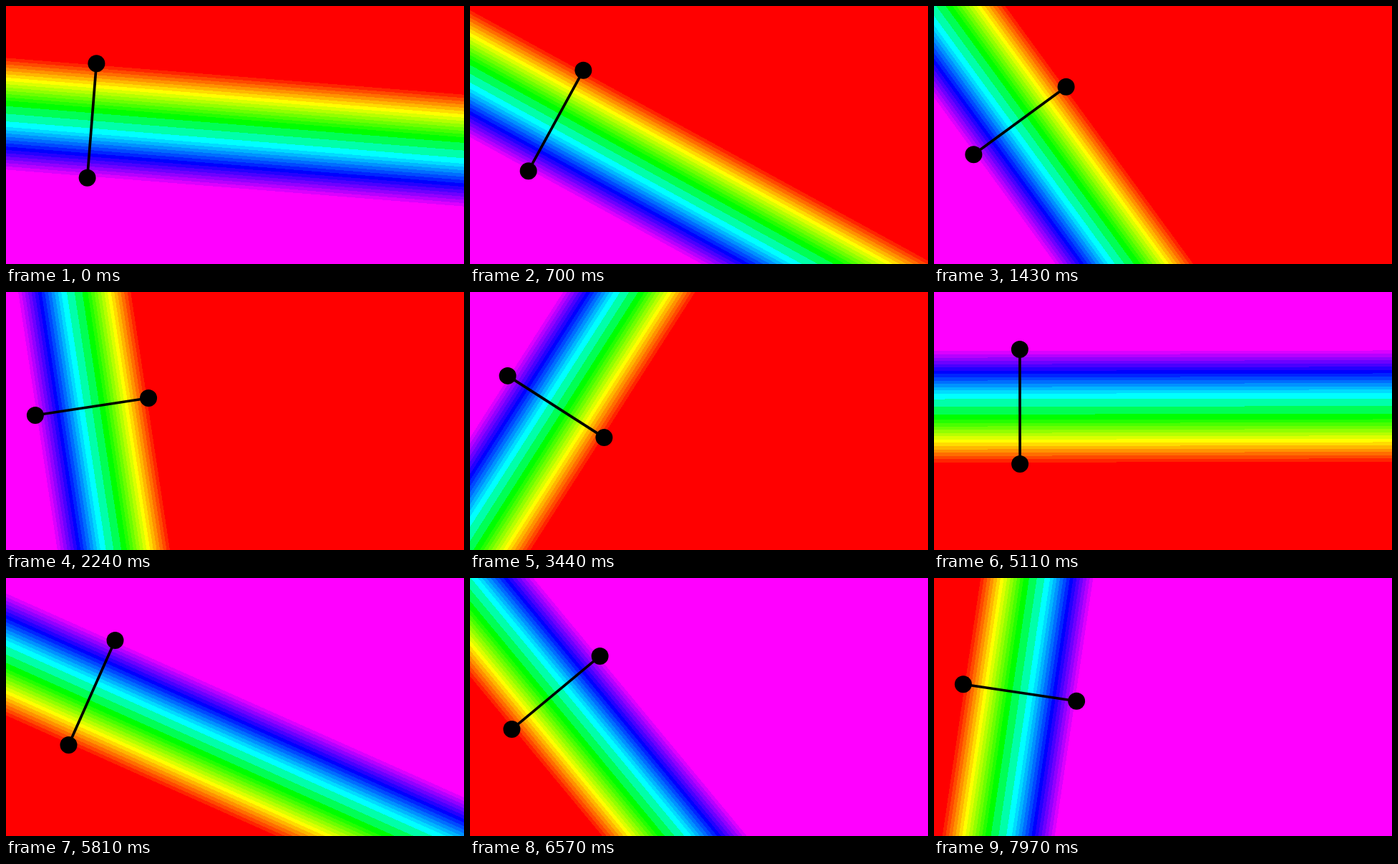
Write an HTML page with a canvas that moves like this. It is 640 by 360 pixels and loops after 8000 ms.

```html
<!DOCTYPE html>
<html lang="en">
<head>
<meta charset="utf-8">
<title>Rotating spectrum</title>
<style>
  html, body { margin: 0; width: 100%; height: 100%; overflow: hidden; background: #f00; }
  canvas { display: block; width: 640px; height: 360px; }
</style>
</head>
<body>
<canvas id="stage" width="640" height="360"></canvas>
<script>
  const ctx = document.getElementById('stage').getContext('2d');
  const LOOP = 8000, FRAME = 1000 / 30;
  const CENTER = { x: 120, y: 160 }, RADIUS = 80;
  const START_ANGLE = 0.08, ANGLE_STEP = 0.02;

  // Hue corners from red to magenta; blue has fewer levels than red and green.
  const corners = [[255, 0, 0], [255, 255, 0], [0, 255, 0], [0, 255, 255], [0, 0, 255], [255, 0, 255]];
  const levels = [7, 7, 3, 7, 7];
  const stops = buildStops();

  function buildStops() {
    const result = [];
    levels.forEach((count, i) => {
      for (let k = 0; k <= count; k++) {
        const rgb = corners[i].map((c, j) => Math.round(c + (corners[i + 1][j] - c) * k / count));
        const color = `rgb(${rgb})`;
        const from = Math.max(0, (k - 0.5) / count);
        const to = Math.min(1, (k + 0.5) / count);
        result.push([(i + from) / 5, color], [(i + to) / 5, color]);
      }
    });
    return result;
  }

  function dot(x, y) {
    ctx.beginPath();
    ctx.arc(x, y, 12, 0, Math.PI * 2);
    ctx.fill();
  }

  function draw(time) {
    // Frame starts are rounded to 10 ms, so a step may come up to 3.34 ms early.
    const step = Math.min(239, Math.floor((time % LOOP + 3.34) / FRAME));
    const angle = START_ANGLE + step * ANGLE_STEP;
    const dx = RADIUS * Math.sin(angle), dy = -RADIUS * Math.cos(angle);
    const red = [CENTER.x + dx, CENTER.y + dy];
    const magenta = [CENTER.x - dx, CENTER.y - dy];

    const spectrum = ctx.createLinearGradient(...red, ...magenta);
    stops.forEach(([offset, color]) => spectrum.addColorStop(offset, color));
    ctx.fillStyle = spectrum;
    ctx.fillRect(0, 0, 640, 360);

    ctx.fillStyle = ctx.strokeStyle = '#000';
    ctx.lineWidth = 3.7;
    ctx.beginPath();
    ctx.moveTo(...red);
    ctx.lineTo(...magenta);
    ctx.stroke();
    dot(...red);
    dot(...magenta);
  }

  function tick(now) {
    draw(now);
    requestAnimationFrame(tick);
  }

  draw(0);
  requestAnimationFrame(tick);
</script>
</body>
</html>
```
